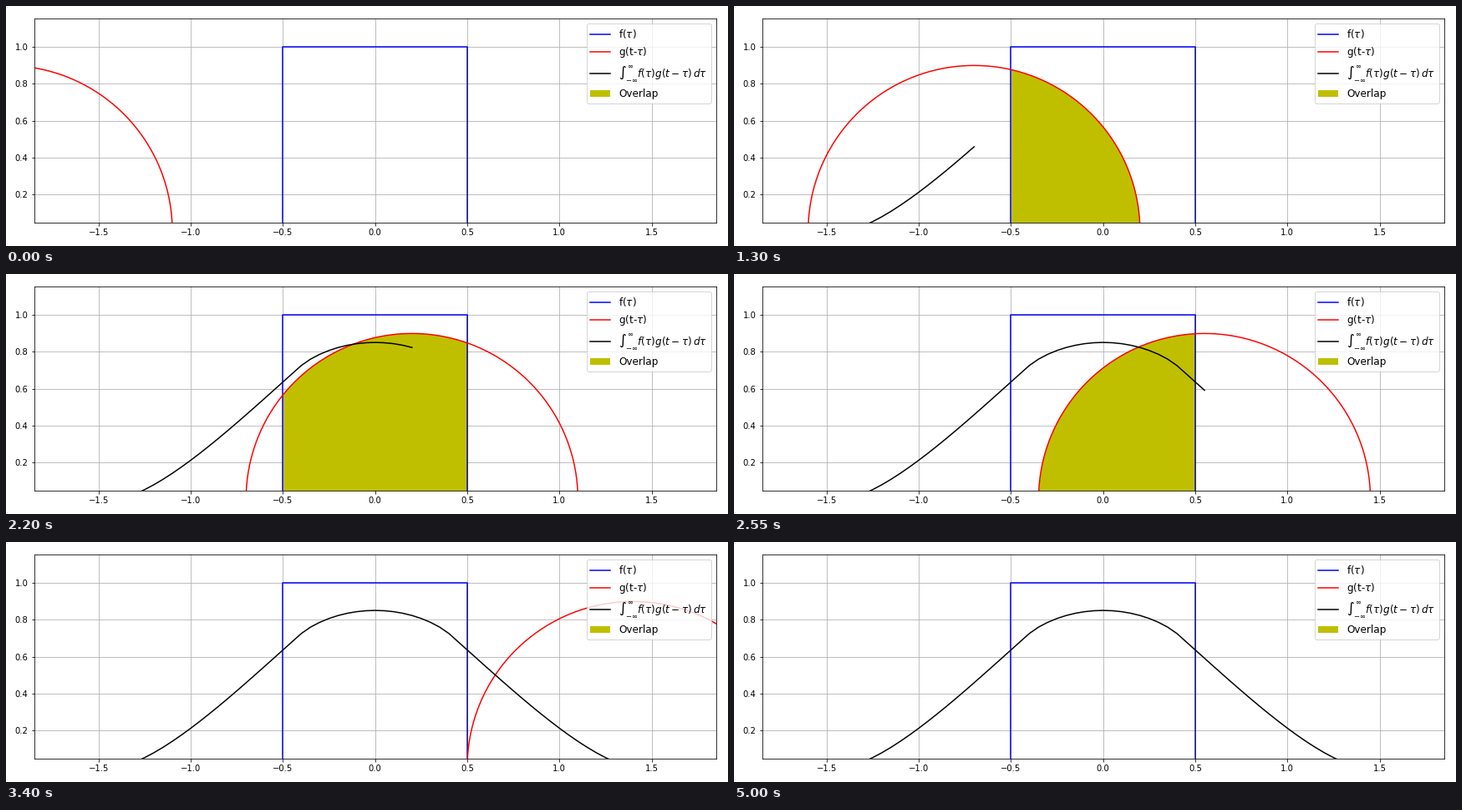
Recreate the animation shown at these times as a matplotlib script. Size 864x288 px, loop 5050 ms.

```python
import numpy as np
import matplotlib.pyplot as plt
from matplotlib.animation import FuncAnimation
from matplotlib.patches import Polygon

W, H, DPI = 864, 288, 72
FRAMES, STEP_MS = 101, 50
START, DT = -2.0, 0.05
R = 0.9       # radius of the half-disc g
HALF = 0.5    # half width of the box f


def area(x):
    """Antiderivative of sqrt(R^2 - x^2), flat outside the disc."""
    x = np.clip(x, -R, R)
    return 0.5 * (x * np.sqrt(R * R - x * x) + R * R * np.arcsin(x / R))


def convolution(t):
    return area(HALF - t) - area(-HALF - t)


def shift(n):
    return START + DT * n


fig = plt.figure(figsize=(W / DPI, H / DPI), dpi=DPI, facecolor="white")
left, bottom, width, height = 33.6, 27.95, 816.2, 245.0
ax = fig.add_axes([left / W, bottom / H, width / W, height / H])
x_max = 1.85
y_half = x_max * height / width
ax.set_xlim(-x_max, x_max)
ax.set_ylim(0.6 - y_half, 0.6 + y_half)
ax.set_xticks(np.arange(-1.5, 1.6, 0.5))
ax.set_yticks(np.arange(0.2, 1.1, 0.2))
ax.set_axisbelow(True)
ax.grid(True)

overlap = Polygon([(0, 0), (0, 0), (0, 0)], facecolor="y", lw=0, zorder=1.2,
                  label="Overlap")
ax.add_patch(overlap)
ax.plot([-x_max, -HALF, -HALF, HALF, HALF, x_max], [0, 0, 1, 1, 0, 0],
        color="b", lw=1.5, label=r"f($\tau$)")
ax.plot([HALF, HALF], [0, 1], color="#33333f", lw=1)
disc, = ax.plot([], [], color="r", lw=1.5, label=r"g(t-$\tau$)")
result, = ax.plot([], [], color="k", lw=1.5,
                  label=r"$\int_{-\infty}^{\infty}f(\tau)g(t-\tau)\,d\tau$")

handles, labels = ax.get_legend_handles_labels()
order = sorted(range(len(labels)), key=lambda i: labels[i] == "Overlap")
ax.legend([handles[i] for i in order], [labels[i] for i in order],
          loc="upper right", fontsize=12)

angle = np.linspace(np.pi, 0, 241)


def draw(n):
    t = shift(n)
    disc.set_data(t + R * np.cos(angle), R * np.sin(angle))

    times = shift(np.arange(n + 1))
    result.set_data(times, convolution(times))

    lo, hi = max(-HALF, t - R), min(HALF, t + R)
    overlap.set_visible(hi > lo)
    if hi > lo:
        x = np.linspace(lo, hi, 160)
        y = np.sqrt(np.maximum(R * R - (x - t) ** 2, 0))
        overlap.set_xy(np.column_stack([np.r_[lo, x, hi], np.r_[0, y, 0]]))
    return disc, result, overlap


anim = FuncAnimation(fig, draw, frames=FRAMES, interval=STEP_MS,
                     repeat=True, repeat_delay=0, blit=False)
plt.show()
```
